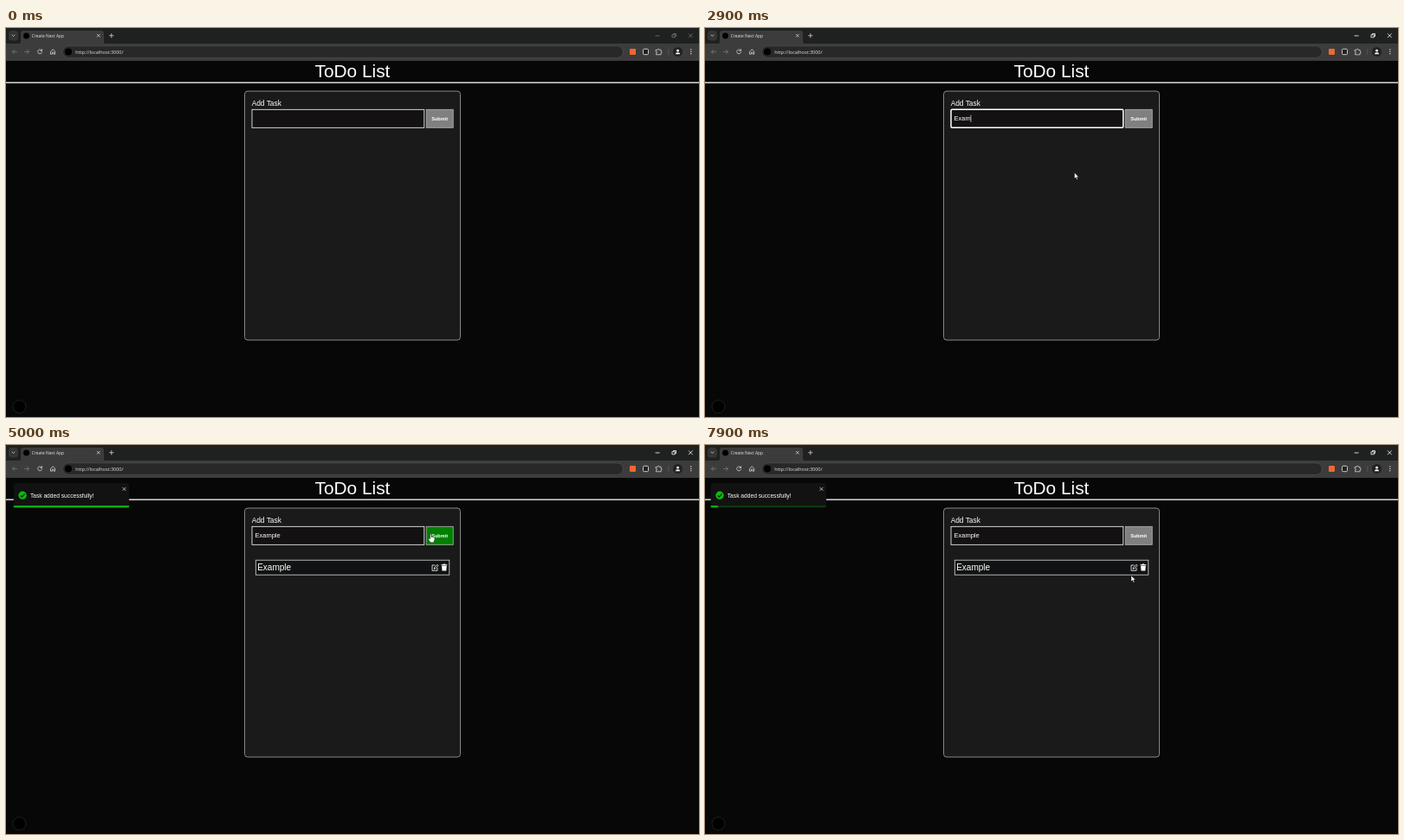
Animation of 800 by 450 pixels, one loop 8 s. Source, as an HTML page:

```html
<!DOCTYPE html>
<html lang="en">
<head>
<meta charset="utf-8">
<title>ToDo List</title>
<style>
  html, body { margin: 0; width: 100%; height: 100%; overflow: hidden; background: #070707; }
  svg { display: block; width: 800px; height: 450px; }
  text { font-family: "Liberation Sans", Arial, sans-serif; fill: #fff; white-space: pre; }
  .ui { font-family: "Open Sans", "Noto Sans", sans-serif; fill: #e6e6e6; }
  .line { fill: none; stroke: #d5d5d5; stroke-width: .8; stroke-linecap: round; stroke-linejoin: round; }
  .dim { stroke: #777; }
</style>
</head>
<body>
<svg viewBox="0 0 800 450">
  <!-- tab strip -->
  <rect width="800" height="19" fill="#1f2020"/>
  <rect x="3" y="3" width="11" height="11.5" rx="3.5" fill="#343535"/>
  <path class="line" d="M7 8l1.5 1.5L10 8"/>
  <path d="M14 18.5q3 0 3-3V6q0-3 3-3h90q3 0 3 3v9.500q0 3 3 3z" fill="#3c3c3c"/>
  <circle cx="23.500" cy="9" r="3.500" fill="#000"/>
  <text class="ui" x="29.800" y="10.800" font-size="4.900">Create Next App</text>
  <path class="line" d="M105.200 7.300l3 3m0-3l-3 3M119.500 8.800h4.500m-2.250-2.250v4.500"/>
  <g id="controls" class="line">
    <path d="M750 9h4.200"/>
    <path d="M769.300 7.800h3v3h-3zM770.500 7.500v-.9h3v3h-.9"/>
    <path d="M788.200 6.700l4.200 4.200m0-4.200l-4.200 4.200"/>
  </g>

  <!-- toolbar -->
  <rect y="18" width="800" height="20" fill="#3c3c3c"/>
  <path class="line dim" d="M12.500 27.500h-5m2.200-2.300l-2.300 2.300 2.300 2.300M21.500 27.500h5m-2.200-2.300l2.300 2.300-2.300 2.300"/>
  <path class="line" d="M41.300 26a2.500 2.500 0 1 0 .3 2M41.500 24.700v1.700h-1.700"/>
  <path class="line" d="M51.800 27l2.400-2.200 2.400 2.200v3.200h-1.600v-2h-1.600v2h-1.600z"/>
  <rect x="65.300" y="20.800" width="647" height="13.600" rx="6.800" fill="#282828" stroke="#555" stroke-width=".6"/>
  <circle cx="72" cy="27.500" r="4" fill="#000"/>
  <text class="ui" x="80.300" y="29.500" font-size="5.500">http://localhost:3000/</text>
  <rect x="720" y="24" width="7" height="7" rx="1" fill="#ee692f"/>
  <rect x="735.500" y="24.300" width="6" height="6.400" rx="1.200" fill="#222" stroke="#ddd" stroke-width=".9"/>
  <path class="line" d="M750.500 25.300h1.800a1 1 0 0 1 2 0h1.800v1.800a1 1 0 0 1 0 2v1.700h-5.600v-1.700a1 1 0 0 0 0-2z"/>
  <path d="M764.700 24v7" stroke="#5c5c5c" stroke-width=".7"/>
  <circle cx="775.500" cy="27.500" r="5.500" fill="#222"/>
  <path d="M772.900 30.300q0-2 2.600-2t2.600 2z" fill="#fff"/>
  <circle cx="775.500" cy="26.200" r="1.400" fill="#fff"/>
  <g fill="#ddd"><circle cx="790.800" cy="25" r=".7"/><circle cx="790.800" cy="27.400" r=".7"/><circle cx="790.800" cy="29.800" r=".7"/></g>

  <!-- page -->
  <text x="400" y="57" font-size="20.830" text-anchor="middle">ToDo List</text>
  <rect y="62.500" width="800" height="1.400" fill="#e8e8e8"/>
  <rect x="275.500" y="73" width="249" height="288" rx="3.500" fill="#1a1a1a" stroke="#a5a5a5" stroke-width=".8"/>
  <text x="283.700" y="89.500" font-size="8.330">Add Task</text>
  <rect id="field" x="284" y="94.300" width="198.800" height="21" fill="#141112" stroke="#fff"/>
  <text id="typed" x="287.500" y="107.400" font-size="7.500"></text>
  <rect id="caret" y="100.500" width=".6" height="8.500" fill="#fff"/>
  <rect id="button" x="485.200" y="94.300" width="31" height="21" stroke="#b5b5b5" stroke-width=".8"/>
  <text x="500.600" y="107" font-size="5.560" font-weight="bold" text-anchor="middle">Submit</text>
  <g id="item">
    <rect x="288.300" y="133.200" width="223.500" height="17" fill="#111213" stroke="#d8d8d8" stroke-width=".8"/>
    <text x="290.200" y="145.200" font-size="10">Example</text>
    <path class="line" d="M495 139h-3v6.300h6v-2.800M494.300 143.200l.3-1.600 3.300-3.300 1.200 1.200-3.300 3.300z" style="stroke:#fff"/>
    <path d="M502.400 138.300h2l.5-.7h2l.5.700h2v1h-7zM503 139.800h5.800l-.5 5.800h-4.800z" fill="#fff"/>
  </g>
  <circle cx="15.500" cy="438" r="7.500" fill="#000" stroke="#2b2b2b" stroke-width=".7"/>

  <g id="toast">
    <rect x="6.700" y="44" width="133.300" height="28.300" rx="2.500" fill="#121212"/>
    <circle cx="17" cy="58.300" r="4.700" fill="#07bc0c"/>
    <path d="M14.700 58.500l1.700 1.700 3-3.500" fill="none" stroke="#121212" stroke-width="1.100"/>
    <text x="25.800" y="60.700" font-size="6.670">Task added successfully!</text>
    <path class="line" d="M132.700 49.200l3.400 3.400m0-3.400l-3.400 3.400"/>
    <rect x="6.700" y="70.200" width="133.300" height="2.100" rx="1" fill="#07bc0c" opacity=".25"/>
    <rect id="bar" x="6.700" y="70.200" height="2.100" fill="#07bc0c"/>
  </g>

  <g id="pointer">
    <path id="arrow" d="M0 0v7l1.600-1.500 1.200 2.700 1.100-.5-1.200-2.600h2.200z" fill="#fff" stroke="#000" stroke-width=".4"/>
    <path id="beam" d="M-1.300-3.700h2.600M0-3.700v7.400M-1.300 3.700h2.600" stroke="#fff" stroke-width=".7"/>
    <path id="hand" d="M-.7 6V.8q0-.8.7-.8t.7.800v3l3.200.6q1 .2.900 1.200l-.6 2.600-.8 1.800h-3.600l-2.400-3.300q-.2-.9.6-1z" fill="#fff" stroke="#000" stroke-width=".4"/>
  </g>
</svg>
<script>
const $ = id => document.getElementById(id);
const set = (id, attrs) => { for (const k in attrs) $(id).setAttribute(k, attrs[k]); };
const show = (id, on) => set(id, { visibility: on ? 'visible' : 'hidden' });

const LOOP = 8000, ACTIVE = 300, FOCUS = 1000, CLICK = 4300, TOAST = 4385, ENTRY = 700;
const word = 'Example';
const keys = [1900, 2400, 2700, 2900, 3000, 3200, 3400];

// time, x, y of the pointer tip
const path = [
  [400, 520, 184], [950, 440, 106], [1080, 440, 108], [1280, 426.5, 167.3],
  [3750, 426.5, 167.3], [4150, 497, 108], [4600, 496, 107.5], [5300, 486.5, 99.5],
  [5500, 486.5, 99.5], [5900, 485, 180], [6300, 486, 156], [6500, 486, 154],
  [6900, 489, 158], [7250, 492, 151]
];
// fraction of the entry, offset
const bounce = [[0, -1250], [.6, 10.4], [.75, -4.2], [.9, 2.1], [1, 0]];

const smooth = p => p * p * (3 - 2 * p);
const easeOut = p => 1 - (1 - p) ** 3;

function along(points, t, ease) {
  const last = points[points.length - 1];
  if (t <= points[0][0]) return points[0].slice(1);
  if (t >= last[0]) return last.slice(1);
  const i = points.findIndex(p => p[0] > t), a = points[i - 1], b = points[i];
  const p = ease((t - a[0]) / (b[0] - a[0]));
  return a.slice(1).map((v, k) => v + (b[k + 1] - v) * p);
}

function draw(t) {
  $('controls').style.stroke = t < ACTIVE ? '#777' : '#fff';

  const [x, y] = along(path, t, smooth);
  const inRow = y > 94 && y < 116;
  const hover = inRow && x > 485 && x < 517;
  const inField = inRow && x > 284 && x < 483;
  const here = t >= path[0][0];
  set('pointer', { transform: `translate(${x} ${y})` });
  show('hand', here && hover);
  show('beam', here && inField);
  show('arrow', here && !hover && !inField);
  set('button', { fill: hover ? '#008000' : '#808080' });

  const focused = t >= FOCUS && t < CLICK;
  set('field', { 'stroke-width': focused ? 1.5 : .8, rx: focused ? 1.2 : 0 });
  const count = keys.filter(k => t >= k).length;
  $('typed').textContent = word.slice(0, count);
  const since = t - (count ? keys[count - 1] : FOCUS);
  show('caret', focused && since % 1000 < 500);
  set('caret', { x: 287.5 + (count ? $('typed').getComputedTextLength() : 0) });

  show('item', t >= CLICK + 50);
  const entry = (t - TOAST) / ENTRY;
  show('toast', entry >= 0);
  set('toast', {
    transform: `translate(${along(bounce, entry, easeOut)[0]} 0)`,
    opacity: easeOut(Math.max(0, Math.min(1, entry / .6)))
  });
  const left = 1 - Math.max(0, t - TOAST - ENTRY) / 3000;
  set('bar', { width: 133.3 * left });
}

const start = performance.now();
function tick() {
  draw((performance.now() - start) % LOOP);
  requestAnimationFrame(tick);
}
tick();
</script>
</body>
</html>
```
